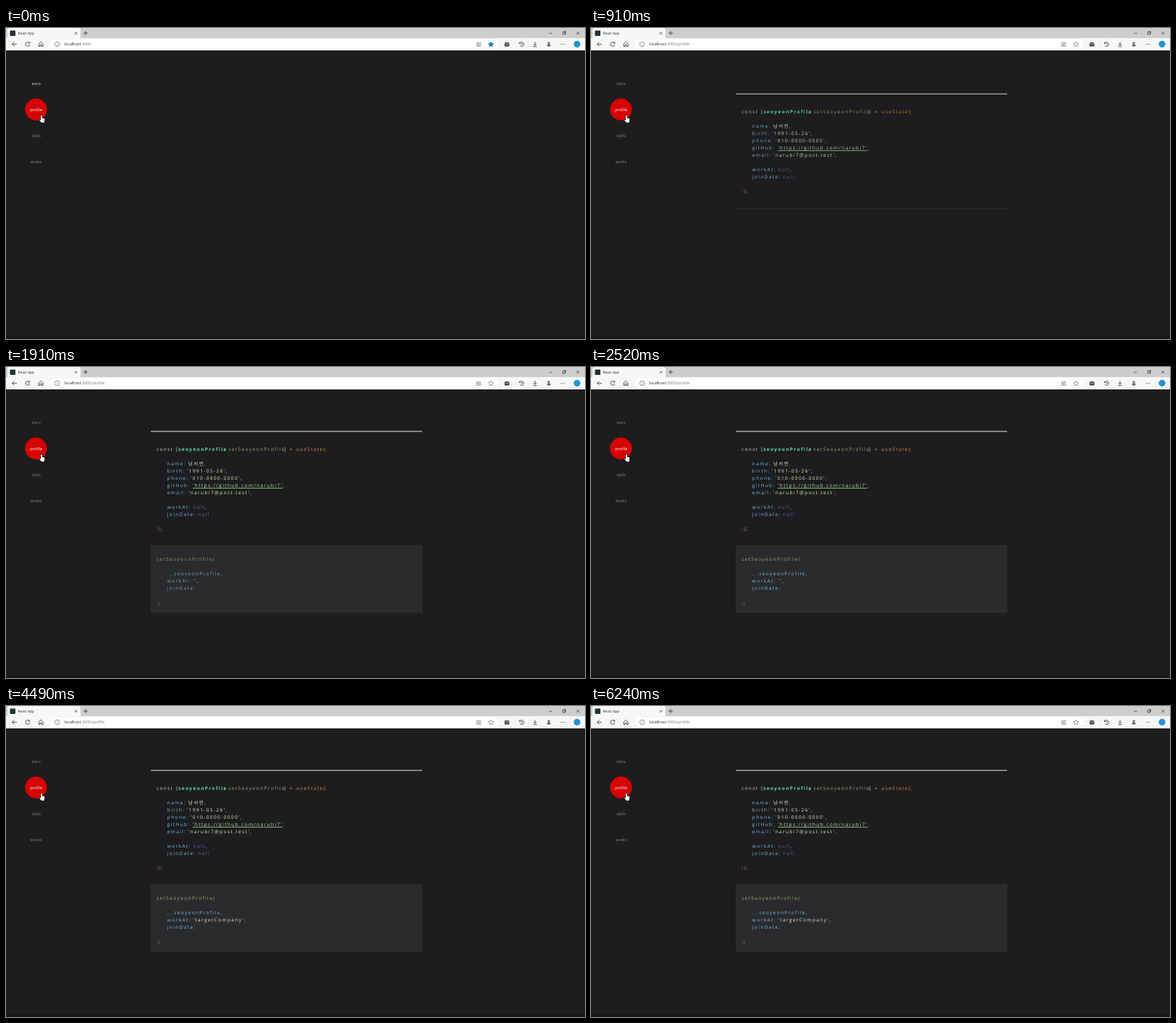
An HTML page with a canvas that plays this animation: 800x430 px, repeating every 6.3 s.

```html
<!DOCTYPE html>
<html lang="en">
<head>
<meta charset="utf-8">
<title>React App</title>
<style>
html, body { margin: 0; width: 100%; height: 100%; overflow: hidden; background: #1e1c1e; }
canvas { display: block; }
</style>
</head>
<body>
<canvas id="stage" width="800" height="430"></canvas>
<script>
const ctx = document.getElementById('stage').getContext('2d');
const LOOP = 6300;
const FONT = '"Open Sans", "Noto Sans", "Noto Sans CJK KR", sans-serif';
const C = {
  page: '#1e1c1e', plain: '#cfd0cf', key: '#6cc3ea', value: '#d3f3c4', link: '#b4eeb0',
  state: '#5fe0ac', setter: '#93ab72', hook: '#cf913f', brace: '#81502a', none: '#4a74ba', ink: '#333'
};

const clamp = v => Math.min(1, Math.max(0, v));

// CSS "ease": cubic-bezier(.25, .1, .25, 1)
function ease(p) {
  p = clamp(p);
  let lo = 0, hi = 1, u = p;
  for (let i = 0; i < 20; i++) {
    u = (lo + hi) / 2;
    const x = 0.75 * u * (1 - u) + u * u * u;
    if (x < p) lo = u; else hi = u;
  }
  return 0.3 * u * (1 - u) ** 2 + 3 * u * u * (1 - u) + u ** 3;
}

function text(str, x, y, color, size, spacing = 0, weight = 400, align = 'left') {
  ctx.font = `${weight} ${size}px ${FONT}`;
  ctx.letterSpacing = spacing + 'px';
  ctx.textAlign = align;
  ctx.fillStyle = color;
  ctx.fillText(str, x, y);
  return x + ctx.measureText(str).width;
}

// Each run is [string, color, x?, weight?]; without x it follows the previous run.
function code(y, ...runs) {
  let pen = 208;
  for (const [str, color, x, weight] of runs) {
    pen = text(str, x ?? pen, y, color, 6.5, 1.4, weight);
  }
  return pen;
}

function rect(x, y, w, h, color) {
  ctx.fillStyle = color;
  ctx.fillRect(x, y, w, h);
}

function round(x, y, w, h, r, color) {
  ctx.fillStyle = color;
  ctx.beginPath();
  ctx.roundRect(x, y, w, h, r);
  ctx.fill();
}

function disc(x, y, r, color) {
  ctx.fillStyle = color;
  ctx.beginPath();
  ctx.arc(x, y, r, 0, 7);
  ctx.fill();
}

function stroke(d, color = C.ink, width = 0.8) {
  ctx.strokeStyle = color;
  ctx.lineWidth = width;
  ctx.stroke(new Path2D(d));
}

function ring(x, y, r, color = C.ink, from = 0, to = Math.PI * 2) {
  ctx.strokeStyle = color;
  ctx.lineWidth = 0.8;
  ctx.beginPath();
  ctx.arc(x, y, r, from, to);
  ctx.stroke();
}

function star(x, y, filled) {
  ctx.beginPath();
  for (let i = 0; i < 10; i++) {
    const a = i * Math.PI / 5 - Math.PI / 2, r = i % 2 ? 1.8 : 3.7;
    ctx.lineTo(x + r * Math.cos(a), y + r * Math.sin(a));
  }
  ctx.closePath();
  ctx.lineJoin = 'round';
  ctx.lineWidth = 0.7;
  ctx.strokeStyle = filled ? '#1677d2' : '#777';
  ctx.fillStyle = '#1677d2';
  if (filled) ctx.fill();
  ctx.stroke();
}

function browser(visited) {
  rect(0, 0, 800, 14, '#cdcdcd');
  rect(0, 14, 800, 17, '#f7f7f7');
  round(2, 0, 101, 16, [3, 3, 0, 0], '#f7f7f7');
  round(5.5, 3.5, 7.5, 7.5, 1, '#20343a');
  text('React App', 16.5, 9, '#222', 4.8);
  stroke('M94.7 5.4l3.6 3.6m0-3.6l-3.6 3.6', C.ink, 0.7);
  stroke('M107 7h6m-3-3v6');
  stroke('M750.2 7.3h4', C.ink, 0.7);
  stroke('M769.2 5.8h3.1v3.2h-3.1zM770.3 5.6v-.8h3v3.1h-.8', C.ink, 0.7);
  stroke('M788.2 5.2l4 4m0-4l-4 4', C.ink, 0.7);

  stroke('M15 22.4H8.5m3-3l-3 3l3 3');
  ring(30, 22.4, 3, C.ink, 0.2, 5.4);
  stroke('M32.8 19v2.2h-2.2');
  stroke('M45.2 22l3-2.8l3 2.8v3.5h-2v-2.3h-2v2.3h-2z');

  round(60, 16, 621, 13, 6.5, '#fff');
  ring(70.7, 22.5, 3.3, '#777');
  stroke('M70.7 22.2v2.2m0-4v.8', '#777', 0.7);
  const end = text('localhost', 80.3, 24.4, '#222', 5.5);
  text(visited ? ':3000/profile' : ':3000', end, 24.4, '#777', 5.5);

  stroke('M650.5 20h2.4v2.4h-2.4zM650.5 23h2.4v2.4h-2.4zM653.6 23h2.4v2.4h-2.4zM655 19.3v3m-1.5-1.5h3', '#777', 0.6);
  star(670, 22.7, !visited);
  round(688.8, 20, 6.6, 5.4, 1, '#444');
  stroke('M689.2 21l2.9 2l2.9-2', '#f7f7f7', 0.7);
  rect(702, 18.5, 0.6, 8, '#ddd');
  ring(712.5, 22.5, 3, C.ink, -2.8, 2.6);
  stroke('M709.3 19.4v2h2M712.5 20.8v2h1.6', C.ink, 0.7);
  stroke('M731 19v5m-2.2-2l2.2 2.2l2.2-2.2M728.4 25.7h5.2');
  disc(750, 20.8, 1.6, '#666');
  round(747.6, 22.6, 4.8, 3, 1.4, '#666');
  for (let i = -1; i < 2; i++) disc(769.3 + i * 2.4, 22.5, 0.6, C.ink);
  disc(789, 22.3, 4.6, '#2492d2');
}

function nav(visited) {
  const item = (str, y, color) => text(str, 41.6, y, color, 5.6, 0, 400, 'center');
  disc(41.4, 112.6, 15.1, '#d70404');
  item('intro', 78.5, visited ? '#8b8a8b' : '#f0f0f0');
  item('profile', 114.8, '#fff');
  item('skills', 151, '#8b8a8b');
  item('works', 187, '#8b8a8b');
}

function hand() {
  const p = new Path2D('M48.1 121.2q.9-.9 1.6 0v3l2.9.7q1 .4.8 1.5l-.7 4.4h-3.8l-2.7-3.2q-.2-1.2 1.1-.7l.8.7z');
  ctx.lineJoin = 'round';
  ctx.strokeStyle = '#111';
  ctx.lineWidth = 1.2;
  ctx.stroke(p);
  ctx.fillStyle = '#fff';
  ctx.fill(p);
}

function profile(t) {
  const p = ease((t - 300) / 1000);
  ctx.save();
  ctx.globalAlpha = p;
  ctx.translate(0, 20 * (1 - p));
  rect(200, 88.5, 375, 1.1, '#d8d8d8');
  code(116,
    ['const', C.plain], ['[', C.plain, 235], ['seoyeonProfile', C.state, 238.2, 700], [',', C.plain, 300.5],
    ['setSeoyeonProfile', C.setter, 307.5], [']', C.plain, 384], ['=', C.plain, 391.8],
    ['useState(', C.hook, 401.3], ['{', C.brace, 440.6]);
  const field = (y, key, x, str, color = C.value, comma = ',') =>
    code(y, [key + ':', C.key, 222.8], [str, color, x], [comma, C.plain]);
  field(136, 'name', 251.8, '남서연');
  field(146, 'birth', 250, "'1991-05-26'");
  field(156, 'phone', 255, "'010-0000-0000'");
  const end = field(166, 'gitHub', 258, "'https://github.com/narubi7'", C.link);
  rect(258, 167.2, end - 261.5, 0.7, C.link);
  field(176, 'email', 252, "'narubi7@post.test'");
  field(196, 'workAt', 258.4, 'null', C.none);
  field(206, 'joinDate', 265, 'null', C.none, '');
  code(226, ['}', C.brace], [')', C.setter, 211.4], [';', C.plain, 214.6]);
  rect(200, 246.8, 375, 0.8, '#353336');
  ctx.restore();
}

function update(t) {
  const word = 'targetCompany';
  const typed = word.slice(0, Math.floor(clamp((t - 2550) / 1300) * word.length));
  ctx.save();
  ctx.globalAlpha = ease((t - 1350) / 1000);
  rect(200, 247, 375, 92.5, '#353436');
  rect(200.5, 247.6, 374, 91.2, '#2b2a2c');
  code(268, ['setSeoyeonProfile(', '#9eb077', 208]);
  code(288, ['...seoyeonProfile', C.key, 222.8], [',', C.plain]);
  code(298, ['workAt:', C.key, 222.8], [`'${typed}'`, C.value, 258.4], [',', C.plain]);
  code(308, ['joinDate:', C.key, 222.8]);
  code(328, [')', '#58613f', 208], [';', C.plain, 211]);
  ctx.restore();
}

function draw(now) {
  const t = now % LOOP;
  const visited = t >= 90;
  rect(0, 0, 800, 430, C.page);
  rect(0, 426, 800, 4, '#181619');
  browser(visited);
  nav(visited);
  if (t > 300) profile(t);
  if (t > 1350) update(t);
  hand();
}

ctx.textRendering = 'geometricPrecision';
const start = performance.now();
function tick() {
  draw(performance.now() - start);
  requestAnimationFrame(tick);
}
tick();
</script>
</body>
</html>
```
